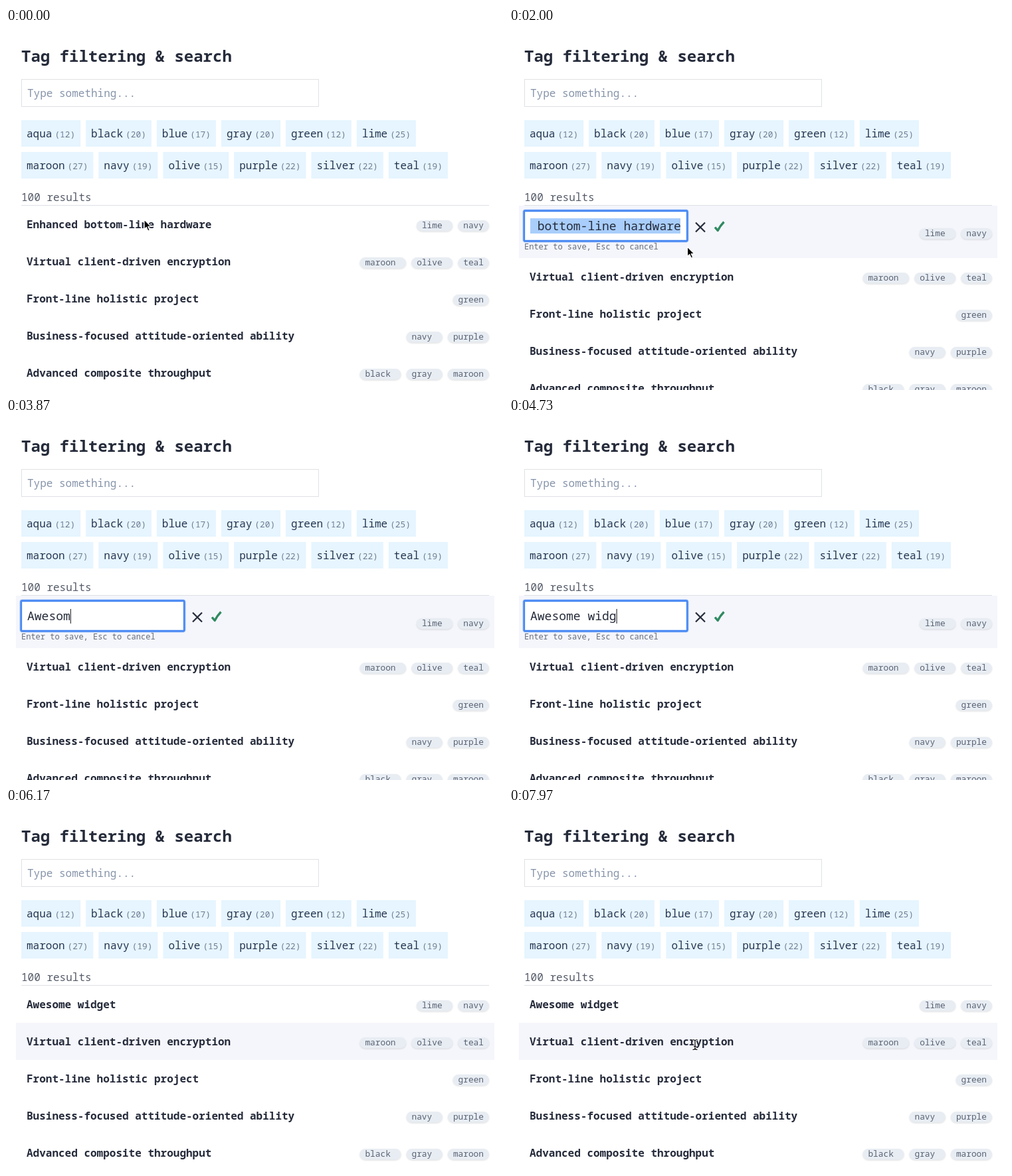
Write an HTML page that moves like this. It is 748 px wide and 546 px high and loops after 8000 ms.

```html
<!DOCTYPE html>
<html lang="en">
<head>
<meta charset="utf-8">
<title>Tag filtering &amp; search</title>
<style>
  html, body { margin: 0; width: 100%; height: 100%; overflow: hidden; background: #fff; }
  svg { display: block; width: 748px; height: 546px; }
  text { font: 16px "Noto Sans Mono", "Liberation Mono", monospace; fill: #252b3a; white-space: pre; }
  .h1 { font-size: 24px; font-weight: 700; }
  .hint { fill: #8694a9; font-weight: 500; }
  .tag { fill: #26364f; }
  .count { font-size: 12.8px; font-weight: 300; fill: #6f7d90; }
  .light { font-weight: 300; fill: #555b68; }
  .name { font-weight: 700; }
  .pill { font-size: 12.8px; font-weight: 300; fill: #596273; }
  .field { font-size: 18px; }
  .help { font-size: 12px; font-weight: 300; fill: #656d7c; }
  .chip { fill: #e8edf3; filter: drop-shadow(0 1px 1px rgba(0, 0, 0, .13)); }
</style>
</head>
<body>
<svg id="stage" viewBox="0 0 748 546" xmlns="http://www.w3.org/2000/svg"></svg>
<script>
const LOOP = 8000, EDIT = 1500, TYPE = 2900, KEY = 150, SAVE = 5670;
const OLD = "Enhanced bottom-line hardware", NEW = "Awesome widget";
const ROW_TOP = 268, ROW_H = 56, EXTRA = 23;
const stage = document.getElementById("stage");

function add(parent, name, attrs = {}, content = "") {
  const el = document.createElementNS("http://www.w3.org/2000/svg", name);
  for (const key in attrs) el.setAttribute(key, attrs[key]);
  el.textContent = content;
  return parent.appendChild(el);
}
const group = (parent = stage) => add(parent, "g");
const rect = (parent, x, y, width, height, attrs) =>
  add(parent, "rect", { x, y, width, height, ...attrs });
const label = (parent, x, y, cls, content) =>
  add(parent, "text", { x, y, class: cls }, content);
const path = (parent, d, attrs) => add(parent, "path", { d, ...attrs });
const show = (el, on) => el.setAttribute("visibility", on ? "visible" : "hidden");
const move = (el, x, y) => el.setAttribute("transform", `translate(${x} ${y})`);

// Header and search box
label(stage, 23, 51, "h1", "Tag filtering & search");
rect(stage, 23.5, 77.5, 447, 41, { fill: "#fff", stroke: "#dfe1e5" });
label(stage, 32, 104, "hint", "Type something...");

// Tag buttons
const tagLines = [
  "aqua 12,black 20,blue 17,gray 20,green 12,lime 25",
  "maroon 27,navy 19,olive 15,purple 22,silver 22,teal 19"
];
tagLines.forEach((line, i) => {
  let x = 23;
  const y = 139 + i * 48;
  for (const item of line.split(",")) {
    const [tag, count] = item.split(" ");
    const textW = tag.length * 9.6, width = textW + 50.72;
    rect(stage, x, y, width, 40, { fill: "#e6f5ff" });
    label(stage, x + 8, y + 26, "tag", tag);
    label(stage, x + 12 + textW, y + 25.5, "count", `(${count})`);
    x += width + 8;
  }
});

// Results
label(stage, 23, 261, "light", "100 results");
const hover = rect(stage, 15, ROW_TOP, 720, ROW_H, { fill: "#f5f6fc" });
rect(stage, 23, 267, 704, 1, { fill: "#dcdfe4" });

const items = [
  [OLD, "lime navy"],
  ["Virtual client-driven encryption", "maroon olive teal"],
  ["Front-line holistic project", "green"],
  ["Business-focused attitude-oriented ability", "navy purple"],
  ["Advanced composite throughput", "black gray maroon"]
];
const rows = items.map(([name, tags]) => {
  const g = group(), pills = group(g);
  const title = label(g, 31, 34, "name", name);
  let right = 727;
  tags.split(" ").reverse().forEach((tag, i) => {
    const width = (tag.length + (i ? 1 : 0)) * 7.68 + 16;
    rect(pills, right - width, 22, width, 16.5, { rx: 8.25, class: "chip" });
    label(pills, right - width + 8, 34, "pill", tag);
    right -= width + 8;
  });
  return { g, pills, title };
});

// Inline editor
const editor = group();
rect(editor, 22.75, 275.75, 245.5, 45.5,
  { rx: 2, fill: "#fff", stroke: "#4788f3", "stroke-width": 5, "stroke-opacity": 0.3 });
rect(editor, 22.75, 275.75, 245.5, 45.5,
  { rx: 1, fill: "#fff", stroke: "#4788f3", "stroke-width": 2.8 });
const selection = rect(editor, 32, 287, 226, 23, { fill: "#a9cefb" });
const value = label(editor, 32, 305, "field", "");
const caret = rect(editor, 0, 288, 1, 22, { fill: "#111" });
path(editor, "M281 293.5L295 307.5M295 293.5L281 307.5",
  { stroke: "#252b3a", "stroke-width": 2.2 });
path(editor, "M310 300.5L314.2 305.5Q318 298 323.5 292.5",
  { fill: "none", stroke: "#2f8a60", "stroke-width": 3.4, "stroke-linejoin": "round" });
label(editor, 23, 334, "help", "Enter to save, Esc to cancel");

// Mouse pointers, hot spot at 0,0
const arrow = group(), beam = group();
path(arrow, "M0 0V14.5L3.3 11.4L5.7 17L8.2 16L5.8 10.5H10.4Z",
  { fill: "#000", stroke: "#fff", "stroke-width": 1.2, "stroke-linejoin": "round" });
const bar = "M-3.5 -7.5Q0 -7.5 0 -5.5Q0 -7.5 3.5 -7.5M0 -5.5V5.5M-3.5 7.5Q0 7.5 0 5.5Q0 7.5 3.5 7.5M-2 2.5H2";
path(beam, bar, { fill: "none", stroke: "#fff", "stroke-width": 3 });
path(beam, bar, { fill: "none", stroke: "#000", "stroke-width": 1.2 });

// time, x, y
const track = [
  [0, 208, 289], [30, 208, 289], [800, 224, 299], [1600, 224, 299],
  [2000, 268.5, 330], [2470, 271, 331], [6630, 271, 331], [6730, 286, 337],
  [6870, 286, 337], [7170, 283, 351], [7430, 283, 351], [7970, 280, 357], [LOOP, 280, 357]
];
function pointerAt(t) {
  const i = track.findIndex(k => k[0] > t);
  const [t0, x0, y0] = track[i - 1], [t1, x1, y1] = track[i];
  const p = (t - t0) / (t1 - t0), e = p * p * (3 - 2 * p);
  return [x0 + (x1 - x0) * e, y0 + (y1 - y0) * e];
}

function draw(t) {
  const editing = t >= EDIT && t < SAVE, saved = t >= SAVE;
  const typed = Math.max(0, Math.min(NEW.length, Math.floor((t - TYPE) / KEY)));

  rows.forEach(({ g }, i) => move(g, 0, ROW_TOP + i * ROW_H + (editing && i ? EXTRA : 0)));
  move(rows[0].pills, 0, editing ? 12 : 0);
  show(rows[0].title, !editing);
  rows[0].title.textContent = saved ? NEW : OLD;

  show(hover, t >= 100);
  hover.setAttribute("y", saved ? ROW_TOP + ROW_H : ROW_TOP);
  hover.setAttribute("height", ROW_H + (editing ? EXTRA : 0));

  editor.setAttribute("display", editing ? "inline" : "none");
  show(selection, !typed);
  value.setAttribute("x", typed ? 32 : 42.8);
  value.textContent = typed ? NEW.slice(0, typed) : OLD.slice(9);
  caret.setAttribute("x", 32 + typed * 10.8);
  show(caret, typed && (t - TYPE - typed * KEY) % 1000 < 500);

  const [x, y] = pointerAt(t);
  const visible = t < TYPE + KEY || t >= 6630;
  const overText = (t >= 300 && t < 1850) || t >= 6970;
  move(arrow, x, y);
  move(beam, x, y);
  show(arrow, visible && !overText);
  show(beam, visible && overText);
}

const start = performance.now();
function tick() {
  draw((performance.now() - start) % LOOP);
  requestAnimationFrame(tick);
}
tick();
</script>
</body>
</html>
```
